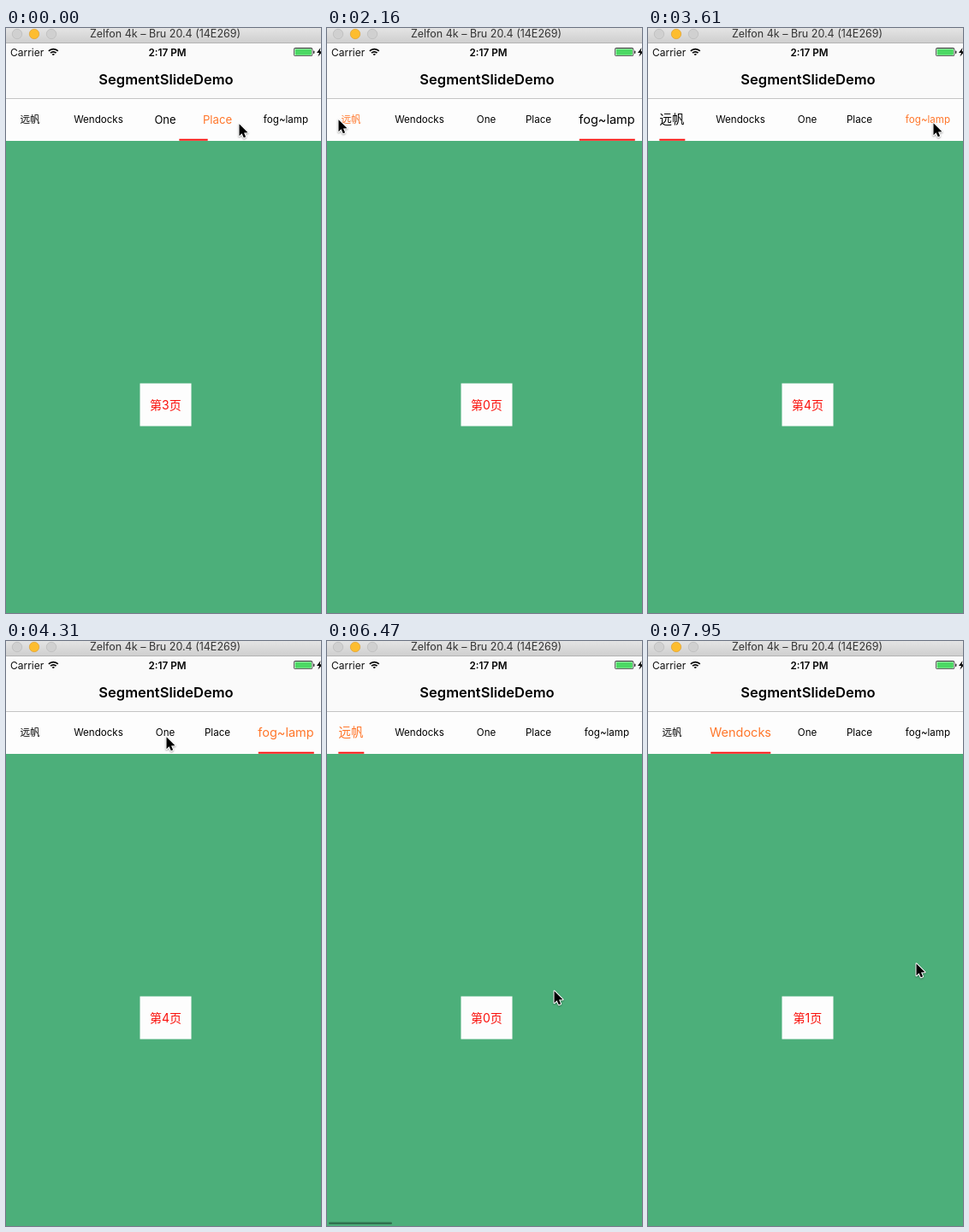
Write an HTML page with a canvas that moves like this. It is 368 px wide and 684 px high and loops after 8000 ms.

```html
<!DOCTYPE html>
<html lang="en">
<head>
<meta charset="utf-8">
<title>SegmentSlideDemo</title>
<style>
  html, body { margin: 0; width: 100%; height: 100%; overflow: hidden; background: #4caf7a; }
  canvas { display: block; width: 368px; height: 684px; }
</style>
</head>
<body>
<canvas id="stage"></canvas>
<script>
const W = 368, H = 684, LOOP = 8000;
const TAP_MS = 250, TRIP_MS = 500, REST_MS = 80;
const DRAG = 6470, RELEASE = 7220, SETTLED = 7720;
const TAB_SIZE = 11.6;
const FONT = 'Inter, "Noto Sans CJK SC", "Noto Sans CJK", sans-serif';
const canvas = document.getElementById('stage');
const ctx = canvas.getContext('2d');
const dpr = window.devicePixelRatio || 1;
canvas.width = W * dpr;
canvas.height = H * dpr;

const tabs = [
  { label: '远帆', x: 28, bar: 30 },
  { label: 'Wendocks', x: 108, bar: 70 },
  { label: 'One', x: 186, bar: 28 },
  { label: 'Place', x: 247, bar: 38 },
  { label: 'fog~lamp', x: 327, bar: 65 }
];

const taps = [
  { at: -2000, tab: 2 }, { at: -130, tab: 3 }, { at: 410, tab: 4 }, { at: 2160, tab: 0 },
  { at: 3610, tab: 4 }, { at: 4600, tab: 2 }, { at: 5540, tab: 0 }
];

// places where the pointer comes to rest, with arrival time
const stops = [
  { at: 50, x: 272, y: 111 }, { at: 110, x: 317, y: 112 }, { at: 920, x: 261, y: 390 },
  { at: 1680, x: 13, y: 106 }, { at: 2500, x: 262, y: 298 }, { at: 3380, x: 333, y: 110 },
  { at: 4310, x: 187, y: 111 }, { at: 5250, x: 29, y: 105 }, { at: 5840, x: 334, y: 407 },
  { at: DRAG, x: 265, y: 408 }, { at: 7100, x: 15, y: 405 }, { at: 7770, x: 320, y: 376 },
  { at: 7950, x: 313, y: 376 }
];

const clamp = v => Math.max(0, Math.min(1, v));
const lerp = (a, b, k) => a + (b - a) * k;
const smooth = k => k * k * (3 - 2 * k);
const span = (t, a, b) => clamp((t - a) / (b - a));
const tapIndex = t => taps.filter(p => p.at <= t).length - 1;

// a trip ends on time, but starts only after the last arrival and a rest after the last tap
function pointerAt(t) {
  const next = stops.findIndex(s => s.at > t);
  if (next === 0) return stops[0];
  if (next < 0) return stops[stops.length - 1];
  const a = stops[next - 1], b = stops[next];
  const start = Math.max(a.at, b.at - TRIP_MS, taps[tapIndex(b.at)].at + REST_MS);
  const k = smooth(span(t, start, b.at));
  return { x: lerp(a.x, b.x, k), y: lerp(a.y, b.y, k) };
}

function swipeAt(t) {
  const pulled = Math.max(0, 253 - pointerAt(Math.min(t, RELEASE)).x) / W;
  return lerp(1, pulled, Math.pow(1 - span(t, RELEASE, SETTLED), 3));
}

// from/to tab, progress of size, progress of colour, visible page
function stateAt(t) {
  if (t >= DRAG) {
    const s = swipeAt(t);
    return { from: 0, to: 1, grow: s, tint: s, page: s };
  }
  const i = tapIndex(t), { at, tab } = taps[i];
  return { from: taps[i - 1].tab, to: tab, grow: smooth(span(t, at, at + TAP_MS)), tint: 1, page: tab };
}

function text(str, x, y, size, color, weight = 400, align = 'center') {
  ctx.font = `${weight} ${size}px ${FONT}`;
  ctx.textAlign = align;
  ctx.fillStyle = color;
  ctx.fillText(str, x, y);
}

function rect(x, y, w, h, color) {
  ctx.fillStyle = color;
  ctx.fillRect(x, y, w, h);
}

function pill(x, y, w, h, r, color) {
  ctx.beginPath();
  ctx.roundRect(x, y, w, h, r);
  ctx.fillStyle = color;
  ctx.fill();
}

function poly(points) {
  ctx.beginPath();
  points.forEach(([x, y]) => ctx.lineTo(x, y));
  ctx.closePath();
}

function drawWindowBar() {
  const g = ctx.createLinearGradient(0, 0, 0, 17);
  g.addColorStop(0, '#e4e4e4');
  g.addColorStop(1, '#cfcfcf');
  rect(0, 0, W, 17, g);
  rect(0, 17, W, 1, '#b4b4b4');
  for (let i = 0; i < 3; i++) {
    ctx.beginPath();
    ctx.arc(13 + i * 20, 7, 5.7, 0, Math.PI * 2);
    ctx.fillStyle = i === 1 ? '#fdbd2f' : '#d0d0d0';
    ctx.fill();
    ctx.lineWidth = 0.7;
    ctx.strokeStyle = i === 1 ? '#dea032' : '#b9b9b9';
    ctx.stroke();
  }
  text('Zelfon 4k – Bru 20.4 (14E269)', 186, 11.2, 12.5, '#333');
}

function drawWifi(x, y) {
  ctx.strokeStyle = '#000';
  ctx.lineWidth = 1.7;
  for (let r = 1.5; r < 9; r += 3.1) {
    ctx.beginPath();
    ctx.arc(x, y, r, -Math.PI * 0.75, -Math.PI * 0.25);
    ctx.stroke();
  }
}

function drawBattery() {
  pill(336, 23.1, 22.4, 10, 2.3, '#333');
  pill(336.8, 23.9, 20.8, 8.4, 1.6, '#fafafa');
  pill(337.6, 24.6, 19.3, 7.1, 1, '#4cd964');
  pill(359, 26.5, 1.4, 3.4, 0.7, '#333');
  poly([[367.5, 23], [363, 29], [366, 29], [364.5, 33.5], [370, 27.2], [366.6, 27.2]]);
  ctx.fillStyle = '#000';
  ctx.fill();
}

function drawHeader() {
  rect(0, 18, W, 64, '#fafafa');
  text('Carrier', 5, 32.5, 12, '#111', 400, 'left');
  text('2:17 PM', 188.5, 32.5, 11.7, '#000', 600);
  drawWifi(55.3, 32.4);
  drawBattery();
  text('SegmentSlideDemo', 187, 66, 16.5, '#000', 600);
  rect(0, 82, W, 1, '#c4c4c4');
}

function drawTabs(s) {
  rect(0, 83, W, 49, '#fdfdfd');
  const share = (i, k) => i === s.to ? k : i === s.from ? 1 - k : 0;
  tabs.forEach((tab, i) => {
    const size = TAB_SIZE * (1 + share(i, s.grow) * 0.25);
    const tint = share(i, s.tint);
    const color = `rgb(${255 * tint}, ${118 * tint}, ${42 * tint})`;
    text(tab.label, tab.x, 107 + size * 0.36, size, color);
  });
  const from = tabs[s.from], to = tabs[s.to];
  const w = lerp(from.bar, to.bar, s.grow);
  rect(lerp(from.x, to.x, s.grow) - w / 2 + 0.3, 129.7, w, 2, '#f5100c');
}

function drawPages(page) {
  rect(0, 132, W, H - 132, '#4caf7a');
  tabs.forEach((_, i) => {
    const x = 156.5 + (i - page) * W;
    rect(x, 415.5, 60, 50, '#fdfdfd');
    text(`第${i}页`, x + 29.9, 445.5, 14, '#fa0f0a');
  });
}

function drawScrollbar(t, page) {
  if (t < DRAG) return;
  const alpha = 0.36 * (1 - span(t, 7520, 7770));
  pill(2 + page * 73, 679.4, 74, 2.6, 1.3, `rgba(0, 0, 0, ${alpha})`);
}

function drawPointer({ x, y }) {
  ctx.save();
  ctx.translate(x + 0.5, y + 1.3);
  poly([[0, 0], [0, 14], [3.1, 11], [5.3, 16], [7.6, 15], [5.5, 10.2], [10, 10]]);
  ctx.lineJoin = 'round';
  ctx.lineWidth = 2;
  ctx.strokeStyle = '#fff';
  ctx.shadowColor = 'rgba(0, 0, 0, 0.35)';
  ctx.shadowBlur = 2 * dpr;
  ctx.shadowOffsetY = dpr;
  ctx.stroke();
  ctx.shadowColor = 'transparent';
  ctx.fillStyle = '#000';
  ctx.fill();
  ctx.restore();
}

function draw(t) {
  const s = stateAt(t);
  ctx.setTransform(dpr, 0, 0, dpr, 0, 0);
  drawWindowBar();
  drawHeader();
  drawPages(s.page);
  drawScrollbar(t, s.page);
  drawTabs(s);
  drawPointer(pointerAt(t));
}

const begin = performance.now();
function tick() {
  draw((performance.now() - begin) % LOOP);
  requestAnimationFrame(tick);
}
tick();
</script>
</body>
</html>
```
